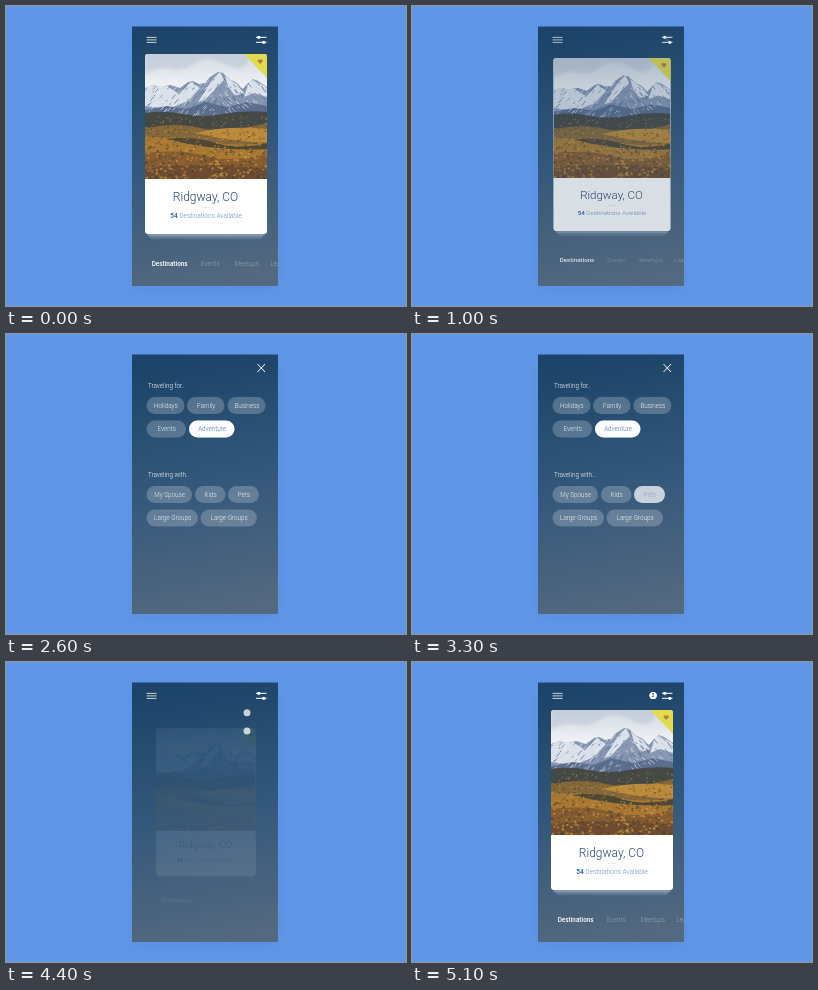
Write an HTML page that moves like this. It is 400 px wide and 300 px high and loops after 5200 ms.

```html
<!DOCTYPE html>
<html lang="en">
<head>
<meta charset="utf-8">
<title>Travel filters</title>
<style>
  html, body { margin: 0; width: 100%; height: 100%; overflow: hidden; background: #6096e8; }
  svg { display: block; width: 400px; height: 300px; font: 300 6.3px Roboto, sans-serif; fill: #fff; }
  .mid { text-anchor: middle; }
  .line { stroke: #fff; fill: none; }
</style>
</head>
<body>
<svg viewBox="0 0 400 300">
  <defs>
    <linearGradient id="night" x1=".445" y1="0" x2=".555" y2="1">
      <stop offset="0" stop-color="#1c4468"/>
      <stop offset=".5" stop-color="#34587b"/>
      <stop offset="1" stop-color="#54697f"/>
    </linearGradient>
    <linearGradient id="sky" x2="0" y2="1">
      <stop offset="0" stop-color="#d3dae4"/>
      <stop offset=".25" stop-color="#eff1f4"/>
    </linearGradient>
    <filter id="soft" x="-20%" y="-20%" width="140%" height="140%"><feGaussianBlur stdDeviation="4"/></filter>
    <filter id="haze"><feGaussianBlur stdDeviation="1.5"/></filter>
    <clipPath id="screen"><rect x="126" y="20.5" width="146" height="259.5"/></clipPath>
    <clipPath id="photoClip"><path d="M139 173V51a3 3 0 0 1 3-3H258a3 3 0 0 1 3 3V173z"/></clipPath>
    <clipPath id="ridge"><path d="M139 82l8-3 8 2 9-2 10 3 8-6 5-1 6 3 6-1 5-6 8-5 5 1 6 6 8 4 6 6 4-5 6-5 5 2 9 6v34H139z"/></clipPath>
  </defs>

  <rect width="400" height="300" fill="#6096e8"/>
  <rect x="126" y="27" width="146" height="258" fill="#3d6cb4" opacity=".15" filter="url(#soft)"/>
  <rect x="126" y="20.5" width="146" height="259.5" fill="url(#night)"/>

  <g clip-path="url(#screen)">
    <g id="home">
      <rect x="143.500" y="200" width="113" height="33" rx="3" fill="#a9b8c8" opacity=".25"/>
      <rect x="141" y="200" width="118" height="30.500" rx="3" fill="#c3ced9" opacity=".35"/>
      <rect x="139" y="48" width="122" height="180" rx="3"/>
      <g clip-path="url(#photoClip)">
        <rect x="139" y="48" width="122" height="125" fill="url(#sky)"/>
        <path d="M139 68q14-8 26-5t24-6 30 1 24-4V46H139z" fill="#b9c4d3" opacity=".55" filter="url(#haze)"/>
        <g clip-path="url(#ridge)">
          <rect x="139" y="60" width="122" height="60" fill="#8797b2"/>
          <path d="M139 78l22 2 12 8 12-12 9 6-12 13-20 8-23-3zM206 74l8-8 4 8-8 8-11 12-7 2zM219 70l11 8 8 9-9 3-7-10zM244 73l17 8v10l-13-4-10 4z" fill="#dbe1ea"/>
          <path d="M139 104l22-4 20 3 18-7 22 5 20-5 20 4v20H139z" fill="#5b6e8d"/>
          <g id="rocks"></g>
        </g>
        <g id="slopes">
          <path d="M139 107q18-3 38 1t40 0 44-2v67H139z" fill="#454945"/>
          <path d="M139 122q30-6 55 0t67-5v56H139z" fill="#84673a"/>
          <path d="M190 127q30-8 71-4v14q-40-2-71-10z" fill="#bb8a3a"/>
          <path d="M139 131q40 0 66 5t56 0v37H139z" fill="#a97934"/>
          <path d="M160 133q28-3 50 4t51 0v6q-50 3-101-10z" fill="#4d4735"/>
          <path d="M139 147q36-4 60 3t62-2v25H139z" fill="#875c30"/>
          <path d="M139 163q50-8 122 0v10H139z" fill="#6d4b30"/>
        </g>
        <g id="trees"></g>
      </g>
      <path d="M238 48H258a3 3 0 0 1 3 3V72z" fill="#e2db4f"/>
      <path d="M254.200 58l-2.400-2.600a1.350 1.350 0 0 1 2.400-1.500a1.350 1.350 0 0 1 2.400 1.500z" fill="#b9803f"/>
      <text class="mid" x="199.500" y="194.500" font-size="12" fill="#23426c">Ridgway, CO</text>
      <path d="M196 201.500h8" stroke="#e3e8ef" stroke-width=".8"/>
      <text class="mid" x="200" y="211.500" font-size="6.500" fill="#6689bd"><tspan font-weight="700" fill="#3a6cb6">54</tspan> Destinations Available</text>
      <text x="145.700" y="260" font-size="6.400" font-weight="500">Destinations</text>
      <g opacity=".4" font-size="6.400">
        <text x="195" y="260">Events</text>
        <text x="228.500" y="260">Meetups</text>
        <text x="264.500" y="260">Leaders</text>
      </g>
    </g>

    <g id="filters">
      <text x="142" y="53.500">Traveling for..</text>
      <text x="142" y="142.500">Traveling with..</text>
    </g>
    <g id="chips"></g>

    <g id="bar">
      <path class="line" stroke-opacity=".85" stroke-width=".9" d="M140.500 31.400h10m-10 2.500h10m-10 2.500h10"/>
      <path class="line" d="M250 31.300h10.500m-10.500 5h10.500"/>
      <circle cx="252.800" cy="31.300" r="1.600"/>
      <circle cx="257.800" cy="36.300" r="1.600"/>
    </g>
    <path id="close" class="line" d="M251.500 30l7.500 8m0-8l-7.500 8"/>
    <circle id="ring" class="line" cx="256" cy="35"/>
    <g id="badge">
      <circle cx="241.200" cy="33.500" r="3.500"/>
      <text class="mid" x="241.200" y="35.200" font-size="4.700" font-weight="500" fill="#23486d">2</text>
    </g>
  </g>
</svg>
<script>
const LOOP = 5200, STEP = 100;
const $ = id => document.getElementById(id);
const set = (el, attrs) => { for (const k in attrs) el.setAttribute(k, attrs[k]); };
const clamp = x => Math.min(1, Math.max(0, x));
const mix = (a, b, p) => a + (b - a) * p;
const ramp = (t, from, to) => clamp((t - from) / (to - from));
const ease = (t, from, to) => { const p = ramp(t, from, to); return p * p * (3 - 2 * p); };
const easeOut = (p, power) => 1 - (1 - p) ** power;

// label, left, right, centre y, time of selection
const pills = [
  ['Holidays', 140.5, 178.5, 71.5], ['Family', 181, 218.5, 71.5], ['Business', 221.5, 259.5, 71.5],
  ['Events', 140.5, 180, 95], ['Adventure', 183, 228.5, 95, 2250],
  ['My Spouse', 140.5, 186, 160.5], ['Kids', 189, 219.5, 160.5], ['Pets', 222, 253, 160.5, 3150],
  ['Large Groups', 140.5, 192, 184], ['Large Groups', 194.5, 251, 184],
];

const pillMarkup = ([label, left, right, y], alpha, ink) =>
  `<g><rect x="${left}" y="${y - 8.5}" width="${right - left}" height="17" rx="8.5" fill-opacity="${alpha}"/>` +
  `<text class="mid" x="${(left + right) / 2 + .4}" y="${y + 2.2}" fill="${ink}">${label}</text></g>`;

$('filters').innerHTML += pills.map(p => pillMarkup(p, .22, '#eef3f8')).join('');
const chosen = pills.filter(p => p[4]);
$('chips').innerHTML = chosen.map(p => pillMarkup(p, 1, '#4a70ac')).join('');

// Seeded flecks give the rocks and trees their grain.
let seed = 11;
const random = () => (seed = seed * 16807 % 2147483647) / 2147483647;
function scatter(id, count, top, bottom, tones, shape) {
  let out = '';
  for (let i = 0; i < count; i++) {
    const depth = i / count, x = mix(139, 261, random()), y = mix(top, bottom, depth);
    const tone = tones[random() * tones.length | 0];
    out += shape(x, y, depth, tone);
  }
  $(id).innerHTML = out;
}
scatter('rocks', 260, 68, 108, ['#eef1f5', '#c3ccd9', '#60759a', '#4c628a'], (x, y, depth, tone) => {
  const lean = x < 213 ? -1 : 1, size = 1 + random() * 3;
  return `<path d="M${x} ${y}l${lean * size} ${size * 1.2}" stroke="${tone}" stroke-width=".9" opacity=".75"/>`;
});
scatter('trees', 700, 110, 174, ['#3c3e36', '#54462f', '#75552f', '#9a6c30', '#c48f3c', '#d9a548'], (x, y, depth, tone) => {
  const r = .5 + depth * .7;
  return `<ellipse cx="${x}" cy="${y}" rx="${r * 1.3}" ry="${r}" fill="${tone}" opacity=".6"/>`;
});

function drawRing(t) {
  const p = Math.max(ramp(t, 650, 1000) % 1, ramp(t, 3700, 4050) % 1);
  const outer = 14 * easeOut(p, 4), inner = 14 * easeOut(p, 1.5);
  set($('ring'), { r: (outer + inner) / 2, 'stroke-width': outer - inner, opacity: p ? 1 : 0 });
}

// Selected pills shrink to dots and fly to the badge.
function drawChip([, left, right, y, start], i, t) {
  const chip = $('chips').children[i], [rect, label] = chip.children;
  const shrink = ease(t, 4100, 4320), fly = easeOut(ramp(t, 4150, 4680), 2);
  const cx = mix((left + right) / 2, 241, clamp(fly * 1.4)), cy = mix(y, 33.5, fly);
  const w = mix(right - left, 7, shrink), h = mix(17, 7, shrink);
  set(rect, { x: cx - w / 2, y: cy - h / 2, width: w, height: h, rx: h / 2 });
  set(label, { opacity: 1 - ramp(t, 4080, 4180) });
  set(chip, { opacity: ease(t, start, start + 250) * mix(1, .75, shrink) });
}

function draw(t) {
  const home = 1 - ease(t, 900, 1250) + ease(t, 4300, 4850);
  const closing = ease(t, 950, 1150) - ease(t, 4100, 4320);
  const scale = mix(.8, 1, home);
  set($('home'), { opacity: home, transform: `translate(199.5 150) scale(${scale}) translate(-199.5 -150)` });
  set($('filters'), { opacity: ease(t, 1050, 1350) - ease(t, 4100, 4350) });
  set($('bar'), { opacity: 1 - closing });
  set($('close'), { opacity: closing });
  set($('badge'), { opacity: ramp(t, 4600, 4750) });
  drawRing(t);
  chosen.forEach((pill, i) => drawChip(pill, i, t));
}

const begin = performance.now();
function tick() {
  const t = (performance.now() - begin) % LOOP;
  draw(Math.floor(t / STEP) * STEP);
  requestAnimationFrame(tick);
}
tick();
</script>
</body>
</html>
```
